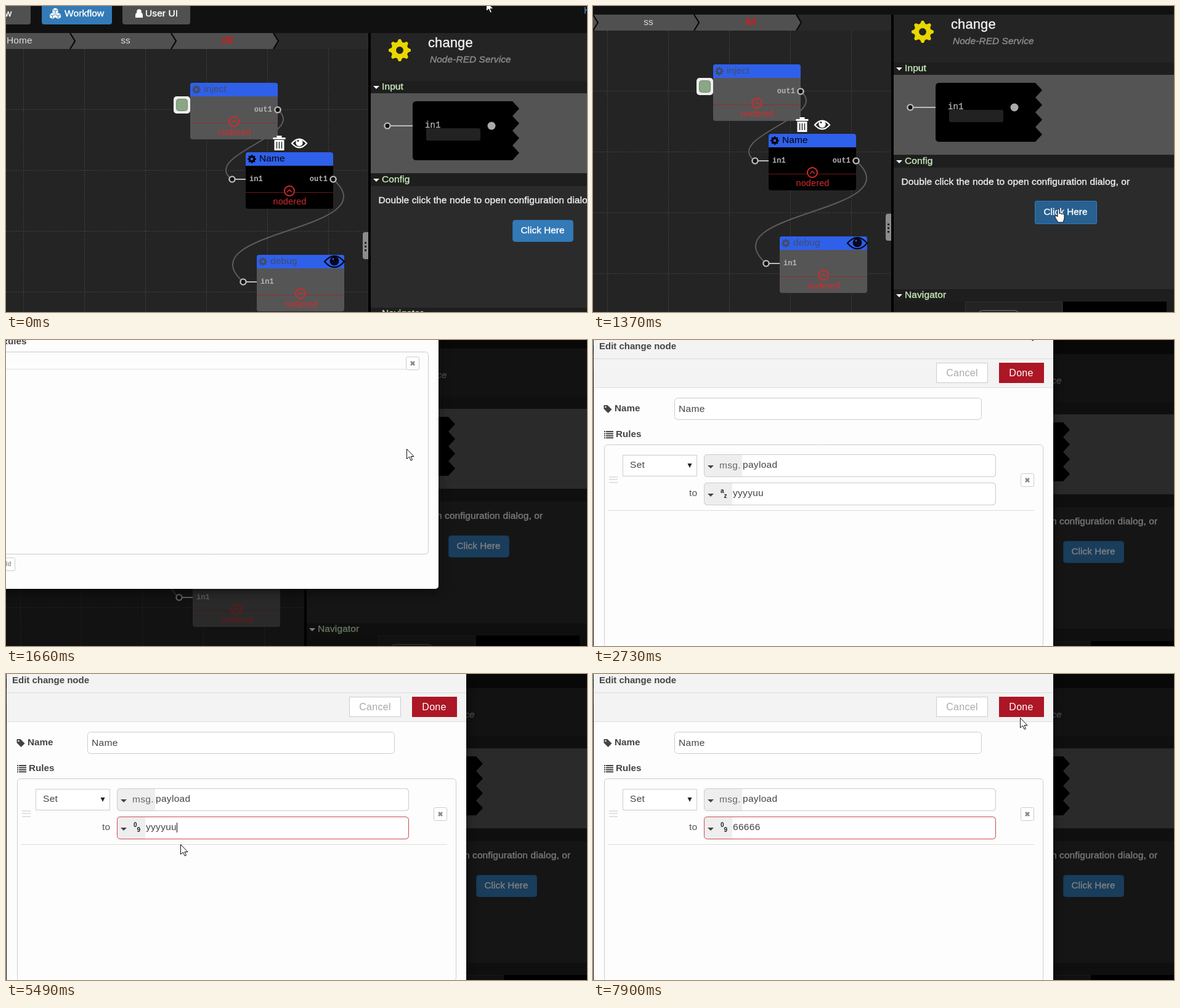
Write an HTML page with a canvas that moves like this. It is 943 px wide and 498 px high and loops after 8000 ms.

```html
<!DOCTYPE html>
<html lang="en">
<head>
<meta charset="utf-8">
<title>Edit change node</title>
<style>
html, body { margin: 0; width: 100%; height: 100%; overflow: hidden; background: #111; }
canvas { display: block; }
</style>
</head>
<body>
<canvas id="stage" width="943" height="498"></canvas>
<script>
const c = document.getElementById('stage').getContext('2d');
const LOOP = 8000;
const SANS = '"Liberation Sans", Arial, sans-serif';
const MONO = '"Liberation Mono", "DejaVu Sans Mono", monospace';
const RED = '#d12c2c', BLUE = '#2f60ea', GREEN = '#c5e8b7';

// Screen updates: [first, last, count]; the picture holds between them.
const UPDATES = [[0, 0, 1], [120, 1120, 8], [1370, 1510, 2], [1660, 1660, 1], [1840, 2290, 4],
  [2580, 3480, 7], [3630, 3890, 3], [4170, 5130, 7], [5250, 5490, 3], [5630, 6170, 5],
  [6540, 7490, 7], [7630, 7900, 3]];
const TICKS = UPDATES.flatMap(([a, b, n]) =>
  Array.from({ length: n }, (_, i) => n > 1 ? a + (b - a) * i / (n - 1) : a));

// Keys: [time, x, y]
const CAMERA = [[0, 0, 0], [1120, -104, -30], [2290, -104, -30], [2730, -59, -21]];
const SLIDE = [[1660, 0, -142], [1840, 0, 0]];
const POINTER = [[0, 779, -8], [1120, 756, 331], [1510, 756, 331], [1660, 650, 177], [2290, 690, 60],
  [2730, 706, -18], [3480, 187, 245], [3890, 187, 245], [4170, 200, 316], [4810, 222, 407],
  [5130, 222, 407], [5490, 283, 277], [5765, 278, 250], [6035, 226, 252], [6170, 181, 258],
  [7490, 181, 258], [7900, 693, 71]];

let heft = 0; // extra stroke that thickens light text on dark

const clamp = (v, a = 0, b = 1) => Math.min(b, Math.max(a, v));

function at(keys, t) {
  const i = keys.findIndex(k => k[0] > t);
  if (i < 0) return keys.at(-1).slice(1);
  if (i === 0) return keys[0].slice(1);
  const a = keys[i - 1], b = keys[i], p = (t - a[0]) / (b[0] - a[0]);
  return [1, 2].map(j => Math.round(a[j] + (b[j] - a[j]) * p));
}

function box(x, y, w, h, fill, stroke, r = 0) {
  c.beginPath();
  if (stroke) c.roundRect(x + .5, y + .5, w - 1, h - 1, r);
  else c.roundRect(x, y, w, h, r);
  if (fill) { c.fillStyle = fill; c.fill(); }
  if (stroke) { c.strokeStyle = stroke; c.lineWidth = 1; c.stroke(); }
}

function text(s, x, y, fill, size = 15.5, style = '', align = 'left', font = SANS) {
  c.font = `${style} ${size}px ${font}`;
  c.textAlign = align;
  c.textBaseline = 'middle';
  c.fillStyle = c.strokeStyle = fill;
  c.fillText(s, x, y);
  if (heft) {
    c.lineWidth = heft;
    c.strokeText(s, x, y);
  }
}

function path(d, x, y, fill, stroke, width = 1) {
  const p = new Path2D(d);
  c.save();
  c.translate(x, y);
  if (fill) { c.fillStyle = fill; c.fill(p); }
  if (stroke) { c.strokeStyle = stroke; c.lineWidth = width; c.stroke(p); }
  c.restore();
}

function disc(x, y, r, fill, stroke, width = 2) {
  c.beginPath();
  c.arc(x, y, r, 0, 7);
  if (fill) { c.fillStyle = fill; c.fill(); }
  if (stroke) { c.strokeStyle = stroke; c.lineWidth = width; c.stroke(); }
}

function gear(x, y, r, fill) {
  c.beginPath();
  for (let i = 0; i < 32; i++) {
    const a = (i - 1.5) * Math.PI / 16, d = i % 4 === 1 || i % 4 === 2 ? r : r * .77;
    c.lineTo(x + d * Math.cos(a), y + d * Math.sin(a));
  }
  c.closePath();
  c.moveTo(x + r * .33, y);
  c.arc(x, y, r * .33, 0, 7);
  c.fillStyle = fill;
  c.fill('evenodd');
}

function eye(x, y, w, color, hole) {
  path(`M${-w} 0Q0 ${-w * 1.15} ${w} 0Q0 ${w * 1.15} ${-w} 0z`, x, y, null, color, 2.2);
  disc(x, y - 1, w * .47, color);
  disc(x - 2, y - 4, 1.4, hole);
}

function port(x, y, nodeX) {
  if (nodeX) path(`M5 0H${nodeX - x}`, x, y, null, '#bbb', 2);
  disc(x, y, 4.6, '#111', '#bbb', 2.4);
}

function node(x, y, name, ins, outs, active) {
  const ink = active ? '#000' : '#424b68';
  box(x, y, 142, 92, active ? '#000' : '#555', null, 4);
  box(x, y, 142, 22, BLUE, null, [4, 4, 0, 0]);
  gear(x + 10, y + 11, 7, ink);
  text(name, x + 22, y + 11, ink);
  path('M0 0H142', x, y + 65.5, null, active ? '#701515' : '#8d3030');
  disc(x + 71, y + 63, 8, active ? '#000' : '#555', RED);
  path('M-4 2L0-2L4 2', x + 71, y + 63, null, RED, 1.5);
  text('nodered', x + 71.5, y + 81, RED, 14.5, '', 'center');
  if (ins) {
    port(x - 22, y + 44, x);
    text('in1', x + 6, y + 43.5, '#b5b5b5', 12, 'bold', 'left', MONO);
  }
  if (outs) {
    port(x + 142, y + 44);
    text('out1', x + 133, y + 43.5, '#b5b5b5', 12, 'bold', 'right', MONO);
  }
}

const wire = d => path(d, 0, 0, null, '#5c5c5c', 2);

function flow() {
  box(0, 44, 588, 500, '#242424');
  c.setLineDash([2, 2]);
  for (let i = 0; i < 6; i++) {
    path('M0 70V540', 28.5 + 99 * i, 0, null, '#444');
    if (i < 4) path('M0 0H588', 0, 168.5 + 99 * i, null, '#444');
  }
  c.setLineDash([]);

  box(0, 44, 588, 26, '#292929');
  path('M0 0H434L442 13L434 26H0z', 0, 44, '#505050');
  for (const x of [104, 268, 434]) path('M0 0L8 13L0 26', x, 44, null, '#080808', 2.2);
  text('Home', 1, 57, '#ddd');
  text('ss', 194, 57, '#ddd', 15.5, '', 'center');
  text('////', 360, 57, '#f01010', 15.5, 'bold', 'center');

  wire('M441 169C491 209 316 242 366 282');
  wire('M531 282C626 367 290 364 385 449');
  box(272, 147, 27, 28, '#eee', null, 5);
  box(276, 151, 19, 20, '#8aa684', '#6f8a6a', 4);
  node(299, 125, 'inject', false, true);
  node(389, 238, 'Name', true, true, true);
  node(407, 405, 'debug', true, false);
  eye(533, 416, 16, '#05081a', BLUE);
  eye(476, 223.5, 12, '#fff', '#242424');
  path('M-10-9H10V-6H-10zM-4-9V-12H4V-9M-8-5H8V12H-8z', 443.5, 223, '#fff');
  path('M-4-2V9M0-2V9M4-2V9', 443.5, 223, null, '#333', 1.6);

  box(579, 368, 9, 44, '#8c8c8c', null, [4, 0, 0, 4]);
  for (const y of [384, 390, 396]) box(582, y, 3, 3, '#222');
}

function section(y, title) {
  box(592, y - 10, 460, 20, '#1e1e1e');
  path('M-5-2H5L0 3z', 601, y, '#fff');
  text(title, 610, y, GREEN);
}

function sidebar(hover) {
  box(588, 44, 4, 500, '#000');
  box(592, 44, 460, 500, '#242424');
  gear(639, 72, 18, '#e9d700');
  text('change', 685, 60.5, '#f2f2f2', 22);
  text('Node-RED Service', 688, 88, '#8c8c8c', 15.4, 'italic');

  section(132, 'Input');
  box(592, 142, 460, 130, '#545454');
  path('M6 0H162l11 12l-11 12l11 12l-11 12l11 12l-11 12l11 12l-11 12H6Q0 96 0 90V6Q0 0 6 0z', 660, 155, '#000');
  port(619, 195, 660);
  text('in1', 680, 194, '#aaa', 14, '', 'left', MONO);
  box(682, 199, 88, 20, '#222', null, 3);
  disc(788, 195, 6.5, '#aaa');

  section(283, 'Config');
  box(592, 293, 460, 198, '#2b2b2b');
  text('Double click the node to open configuration dialog, or', 604.5, 317, '#eee');
  if (hover) box(821, 347, 101, 38, '#286090', '#2b7ecb', 2);
  else box(822, 348, 99, 36, '#337ab7', '#2e6da4', 4);
  text('Click Here', 871, 366, '#fff', 15.2, '', 'center');

  section(501, 'Navigator');
  box(592, 511, 460, 60, '#1c1c1c');
  box(708, 511, 158, 60, '#232323', '#303030');
  box(867, 511, 168, 60, '#000');
  box(728, 525, 69, 40, null, '#777', 8);
}

function topBar() {
  box(0, -20, 1060, 64, '#111');
  box(-40, -10, 80, 40, '#505050', null, 4);
  text('w', -2, 13, '#fff');
  box(58, -10, 114, 40, '#337ab7', null, 4);
  for (const [x, y] of [[80, 8], [75.5, 16], [84.5, 16]]) {
    path('M0-5L4.5-2.5V2.5L0 5L-4.5 2.5V-2.5z', x, y, '#fff');
    path('M-4-2L0 0L4-2M0 0V4', x, y, null, '#337ab7');
  }
  text('Workflow', 95, 13, '#fff');
  box(189, -10, 110, 40, '#505050', null, 4);
  disc(216, 9, 3.8, '#fff');
  path('M-6 7V3Q-6-1-3-1Q0 1.5 3-1Q6-1 6 3V7z', 216, 12, '#fff');
  text('User UI', 226, 13, '#fff');
  text('H', 938, 8, '#3f86c4');
}

function typeIcon(kind, x, y) {
  if (kind === 'bool') {
    disc(x + 5, y, 4.8, '#fff', '#222', 1.4);
    path('M-3 3L3-3A4.3 4.3 0 0 0-3 3z', x + 5, y, '#222');
  } else if (kind === '{}') {
    text(kind, x, y, '#333', 13);
  } else {
    text(kind[0], x, y - 4, '#222', 10, 'bold');
    text(kind[1], x + 5.5, y + 3.5, '#222', 10, 'bold');
  }
}

const MENU = [['msg.'], ['flow.'], ['global.'], ['string', 'az'], ['number', '09'], ['boolean', 'bool'], ['JSON', '{}']];

function menu(open) {
  c.save();
  c.beginPath();
  c.rect(170, 264, 140, 256 * open);
  c.clip();
  box(183, 264, 114, 256, '#fff', '#aaa');
  MENU.forEach(([label, icon], i) => {
    const y = 283 + 35.7 * i;
    if (icon) typeIcon(icon, 193, y);
    text(label, icon ? 210 : 204, y, '#444');
    box(184, Math.round(y + 17), 112, 1, '#ddd');
  });
  c.restore();
}

function field(y, split, border, shade) {
  box(180, y, 474, 37, '#fff', '#ccc', 5);
  box(181, y + 1, split - 181, 35, shade, null, [4, 0, 0, 4]);
  box(180, y, 474, 37, null, border, 5);
  path('M-5-2H5L0 3z', 191, y + 20, '#444');
}

function value(q, pointerX) {
  const typed = clamp(Math.floor((q - 6540) / 158.4 + 1.01), 0, 5);
  const word = typed ? '6'.repeat(typed) : 'yyyyuu';
  text(word, 227, 250, '#444');
  if (q > 5765 && !typed) {
    const left = clamp(pointerX, 227, 277);
    c.save();
    c.beginPath();
    c.rect(left, 241, 278 - left, 19);
    c.clip();
    box(227, 241, 51, 19, '#3297fd');
    text(word, 227, 250, '#fff');
    c.restore();
  }
  if (q >= 4970 && q <= 5765 || typed && q < 7300)
    box(typed ? 228 + Math.round(8.92 * typed) : 277, 242, 1, 16, '#111');
}

function rule(q, pointerX) {
  const open = clamp((q - 3500) / 390), isMenu = open > 0 && q < 4970, isNumber = q >= 4970;
  for (const y of [222, 226, 231]) box(26, y, 14, 2, '#e2e2e2');
  box(48, 187, 121, 35, '#fff', '#ccc');
  text('Set', 60, 204, '#444');
  path('M-3.5-3H3.5L0 4z', 157, 204, '#222');
  field(186, 242, '#ccc', '#eee');
  text('msg.', 205, 205, '#666');
  text('payload', 243, 204, '#444');
  text('to', 156, 250, '#555');
  field(232, 226, isNumber ? '#d0484c' : isMenu ? '#5c9be0' : '#ccc', isMenu ? '#d9d9d9' : '#eee');
  typeIcon(isNumber ? '09' : 'az', 207, 250.5);
  value(q, pointerX);
  if (isMenu) menu(open);
}

function dialog(q, pointerX) {
  const ready = q >= 1840;
  c.save();
  c.shadowColor = 'rgba(0,0,0,.5)';
  c.shadowBlur = 15;
  c.shadowOffsetY = 5;
  box(1, -30, 746, 586, '#fdfdfd', null, 5);
  c.restore();
  box(1, -30, 746, 107, '#f3f3f3', null, [5, 5, 0, 0]);
  box(1, 30, 746, 1, '#ddd');
  box(1, 77, 746, 1, '#ddd');

  c.letterSpacing = '0px';
  text('Edit change node', 10, 11, '#444', 15, 'bold');
  text('Name', 35, 112, '#444', 15.2, 'bold');
  text('Rules', 37, 154, '#444', 15.2, 'bold');
  c.letterSpacing = '0.3px';
  box(557, 37, 84, 33, '#fff', '#ccc');
  text('Cancel', 599, 54.5, '#aaa', 16, '', 'center');
  box(659, 37, 73, 33, '#ad1625');
  text('Done', 695, 54.5, '#fff', 16, '', 'center');

  path('M0 0H6L13 7L7 13L0 6z', 17.5, 106, '#444');
  disc(20.5, 109, 1.2, '#fff');
  for (let y = 148; y < 160; y += 3.4) {
    box(18, y, 2, 2, '#444');
    box(21, y, 12, 2, '#444');
  }
  box(132, 94, 499, 36, '#fff', '#ccc', 5);
  text('Name', 139, 113, '#444');
  box(18, 170, 713, 330, null, '#ccc', 5);
  const rowY = ready ? 277 : 198, crossY = ready ? 217 : 178;
  box(24, rowY, 692, 1, '#ddd');
  box(694, crossY, 22, 22, '#fff', '#ccc', 2);
  path('M-3-3L3 3M3-3L-3 3', 705, crossY + 11, null, '#888', 2.6);
  box(18, 505, 42, 22, '#fff', '#ccc', 2);
  text('+ add', 54, 516, '#999', 10, 'bold', 'right');
  if (ready) rule(q, pointerX);
}

function pointer(q, [x, y], hover) {
  const overText = q > 5490 && q < 7500 && x > 225 && y < 262;
  if (hover)
    path('M-2 0Q0-2 1 0V7L3 6L5 8L7 7L9 9V15L7 21H-1L-6 13Q-6 9-3 11L-2 12z', x, y, '#fff', '#111');
  else if (overText)
    path('M-3-9H3M0-9V9M-3 9H3', x + .5, y, null, '#222');
  else
    path('M0 0V16L4 12.5L6.5 18.5L9 17.5L6.5 12H11.5z', x + .5, y + .5, '#fff', '#111');
}

function draw(t) {
  const q = TICKS.findLast(k => k <= t + .01);
  const [camX, camY] = at(CAMERA, q), spot = at(POINTER, q);
  const hover = q >= 1119 && q < 1510;

  box(0, 0, 943, 498, '#111');
  c.letterSpacing = '0.1px';
  c.save();
  c.translate(camX, camY);
  flow();
  heft = .4;
  topBar();
  sidebar(hover);
  heft = 0;
  c.restore();

  const dim = .5 * clamp((q - 1370) / 290);
  if (dim) box(0, 0, 943, 498, `rgba(0,0,0,${dim})`);
  if (q >= 1660) {
    c.save();
    c.translate(camX + 59, camY + 21 + at(SLIDE, q)[1]);
    dialog(q, spot[0]);
    c.restore();
  }
  pointer(q, spot, hover);
}

function frame() {
  draw(performance.now() % LOOP);
  requestAnimationFrame(frame);
}
frame();
</script>
</body>
</html>
```
